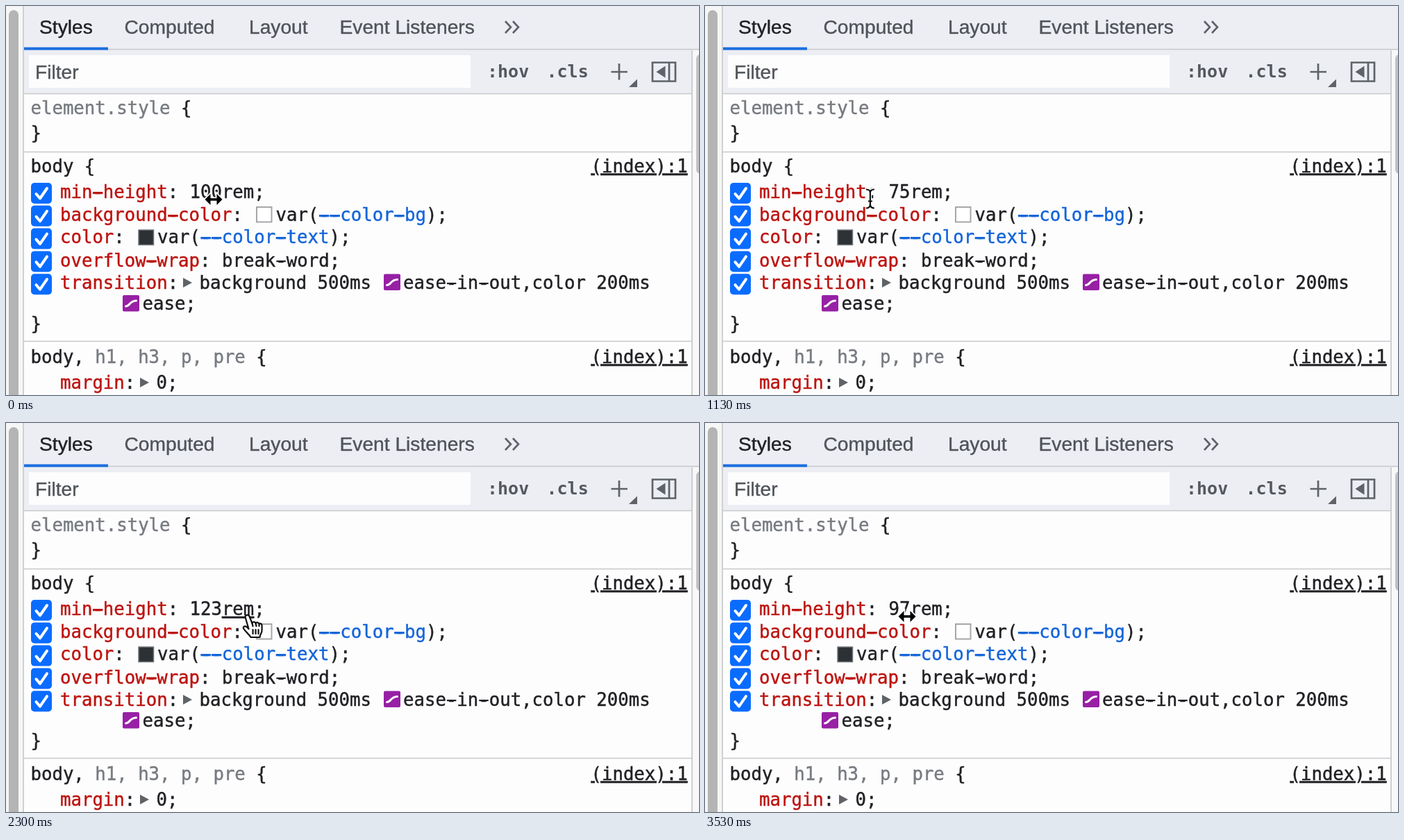
Recreate the animation shown at these times as an HTML page. Size 998x561 px, loop 3.56 s.

```html
<!DOCTYPE html>
<html lang="en">
<head>
<meta charset="utf-8">
<title>Styles pane</title>
<style>
html, body { margin: 0; width: 100%; height: 100%; overflow: hidden; background: #fdfdfe; }
svg { display: block; width: 100vw; height: 100vh; }
text { white-space: pre; fill: #202124; }
.ui { font: 28.2px "Liberation Sans", Arial, sans-serif; fill: #505459; stroke: #505459; stroke-width: .4; }
.ui.on { fill: #202124; stroke: #202124; }
.mono { font: 25.7px "DejaVu Sans Mono", monospace; stroke: #202124; stroke-width: .45; }
.btn { font: bold 25px "DejaVu Sans Mono", monospace; fill: #55595e; }
.link { text-decoration: underline; text-decoration-thickness: 1.6px; text-underline-offset: 2.4px; }
.prop { fill: #bd1410; stroke: #bd1410; }
.name { fill: #1565d8; stroke: #1565d8; }
.dim { fill: #777b80; stroke: #777b80; }
.line { stroke: #c6c8cb; stroke-width: 1.7; }
.icon { fill: none; stroke: #5f6368; stroke-width: 2.7; }
.solid { fill: #5f6368; }
</style>
</head>
<body>
<svg viewBox="0 0 998 561" preserveAspectRatio="none">
  <defs>
    <g id="check">
      <rect width="30" height="30" rx="5" fill="#0a6cff"/>
      <path d="M7.5 16l5.5 6.5L23 8" fill="none" stroke="#fff" stroke-width="4" stroke-linecap="round" stroke-linejoin="round"/>
    </g>
    <g id="ease">
      <rect width="24" height="23.5" rx="2" fill="#9720a5"/>
      <path d="M4.500 16C11 16 9 8.500 19.500 8" fill="none" stroke="#fff" stroke-width="3" stroke-linecap="round"/>
    </g>
    <path id="tri" class="solid" d="M0 1L13 8L0 15Z"/>
    <path id="stem" fill="none" d="M-6 -13Q0 -13 0 -8Q0 -13 6 -13M0 -9V9M-6 14Q0 14 0 8Q0 14 6 14M-3 4H3"/>
  </defs>

  <rect width="998" height="561" fill="#fdfdfe"/>
  <rect width="24" height="561" fill="#f6f6f6"/>
  <rect x="4" y="6" width="14" height="570" rx="7" fill="#b4b4b4"/>
  <rect x="26" width="972" height="126" fill="#eceef4"/>
  <rect x="33" y="71" width="636" height="47" fill="#fdfdfe"/>
  <rect x="988" y="64" width="10" height="497" fill="#f8f8f9"/>
  <rect x="994" y="70" width="12" height="172" rx="6" fill="#c1c1c1"/>
  <path class="line" d="M25 0V561M26 62.500H998M26 126.500H988M26 210.500H988M26 483.500H988M988 64V561"/>
  <rect x="26" y="59.500" width="121" height="4" fill="#1a6fe0"/>

  <text class="ui on" x="48" y="40">Styles</text>
  <text class="ui" x="170.500" y="40">Computed</text>
  <text class="ui" x="350" y="40">Layout</text>
  <text class="ui" x="480.500" y="40">Event Listeners</text>
  <text class="ui" x="42" y="105">Filter</text>
  <text class="btn" x="693" y="103">:hov</text>
  <text class="btn" x="778.500" y="103">.cls</text>
  <path class="icon" d="M719 22l8 8.500l-8 8.500M730 22l8 8.500l-8 8.500"/>
  <path class="icon" d="M871.500 95H895M883 83V106.500M931 81.500H964V108.500H931ZM955 81V109"/>
  <path class="solid" d="M909 105.500V117H897ZM936.500 95L949.500 86.500V103.500Z"/>

  <g id="code"></g>
  <text id="value" class="mono" x="264.500" y="277"><tspan id="num">100</tspan><tspan id="unit">rem</tspan>;</text>

  <rect x="361" y="290" width="21.500" height="21.500" fill="#fff" stroke="#a5a7aa" stroke-width="2"/>
  <rect x="191" y="323" width="21.500" height="21.500" fill="#2c3136" stroke="#6f757a" stroke-width="1.500"/>
  <use href="#tri" x="255" y="391"/>
  <use href="#tri" x="193" y="535"/>
  <use href="#ease" x="544" y="386.500"/>
  <use href="#ease" x="168" y="417"/>

  <g id="resize">
    <path d="M-12.500 0L-4.500 -8V-1.800H4.500V-8L12.500 0L4.500 8V1.800H-4.500V8Z" fill="#000" stroke="#fff" stroke-width="3.500" paint-order="stroke"/>
  </g>
  <g id="beam">
    <use href="#stem" stroke="#fff" stroke-width="4.500"/>
    <use href="#stem" stroke="#111" stroke-width="2.200"/>
  </g>
  <g id="hand" stroke="#111" stroke-width="2.200" stroke-linejoin="round" stroke-linecap="round">
    <path fill="#fff" d="M-7 0C-7 -4 -2 -4 -1 -1L3 9C4 6 7 6 8 9C9 7 12 7 13 10C15 8 17 10 17 12V19C17 23 14 25 14 29H1C-1 25 -6 22 -9 17C-11 14 -8 12 -5 14L-2 17Z"/>
    <path fill="none" d="M3 9L4 13M8 9L9 13M13 10V13M4 18V24M8 18V24M12 18V24"/>
  </g>
</svg>
<script>
const $ = id => document.getElementById(id);
const NS = 'http://www.w3.org/2000/svg';
const LOOP = 3560, PITCH = 15.47;

function add(tag, attrs, parent = $('code')) {
  const el = document.createElementNS(NS, tag);
  for (const k in attrs) el.setAttribute(k, attrs[k]);
  return parent.appendChild(el);
}

// Parts are text, class pairs; hyphens get a wider bar.
function mono(x, y, ...parts) {
  const line = add('text', { x, y, class: 'mono' });
  let col = 0;
  for (let i = 0; i < parts.length; i += 2) {
    const cls = parts[i + 1] || '';
    add('tspan', { class: cls }, line).textContent = parts[i];
    for (const ch of parts[i]) {
      if (ch === '-') {
        const bar = { x: x + col * PITCH + 1, y: y - 8.5, width: 13.5, height: 2.2 };
        add('rect', { ...bar, class: cls, ...(cls ? {} : { fill: '#202124' }) });
      }
      col++;
    }
  }
}

const prop = (y, name) => mono(78, y, name, 'prop', ':');

mono(35.5, 155.5, 'element.style', 'dim', ' {', '');
mono(35.5, 191.5, '}');
mono(35.5, 240, 'body {');
prop(277, 'min-height');
prop(310, 'background-color');
mono(388.5, 310, 'var(', '', '--color-bg', 'name', ');', '');
prop(342, 'color');
mono(218, 342, 'var(', '', '--color-text', 'name', ');', '');
prop(375.5, 'overflow-wrap');
mono(311, 375.5, 'break-word;');
prop(407.5, 'transition');
mono(278.5, 407.5, 'background 500ms');
mono(572, 407.5, 'ease-in-out,color 200ms');
mono(196.5, 437.5, 'ease;');
mono(35.5, 466.5, '}');
mono(35.5, 514.5, 'body, ', '', 'h1, h3, p, pre', 'dim', ' {', '');
prop(552, 'margin');
mono(216.5, 552, '0;');
for (const y of [239.5, 514.5]) mono(842.5, y, '(index):1', 'link');
for (let i = 0; i < 5; i++) add('use', { href: '#check', x: 36, y: 255 + i * 32.8 });

// Time, pointer x, pointer y, dragged value.
const KEYS = [
  [0, 299, 279, 100], [570, 299, 279, 100], [1130, 238, 277.5, 75],
  [1250, 229, 278, 70], [1530, 273, 282, 85], [1930, 345, 280, 119],
  [2130, 360, 280, 125], [2670, 313.5, 280, 111], [3020, 293, 279, 98],
  [3530, 291, 279, 97], [3560, 291, 279, 97]
];

// Tangent that never overshoots the neighbouring keys.
function slope(i, c) {
  const a = KEYS[i - 1], b = KEYS[i], d = KEYS[i + 1];
  if (!a || !d) return 0;
  const l = (b[c] - a[c]) / (b[0] - a[0]), r = (d[c] - b[c]) / (d[0] - b[0]);
  return l * r <= 0 ? 0 : 2 * l * r / (l + r);
}

function at(t, c) {
  let i = 0;
  while (i < KEYS.length - 2 && t >= KEYS[i + 1][0]) i++;
  const a = KEYS[i], b = KEYS[i + 1], span = b[0] - a[0];
  const u = (t - a[0]) / span, v = 1 - u;
  return v * v * (1 + 2 * u) * a[c] + u * u * (1 + 2 * v) * b[c]
    + span * u * v * (v * slope(i, c) - u * slope(i + 1, c));
}

function draw(t) {
  const x = at(t, 1), y = at(t, 2), value = String(Math.round(at(t, 3)));
  const unitX = 264.5 + value.length * PITCH;
  const kind = x < 264.5 ? 'beam' : x < unitX ? 'resize' : 'hand';
  $('num').textContent = value;
  $('unit').setAttribute('class', kind === 'hand' ? 'link' : '');
  for (const id of ['beam', 'resize', 'hand']) {
    $(id).style.display = id === kind ? '' : 'none';
    $(id).setAttribute('transform', `translate(${x} ${y})`);
  }
}

const start = performance.now();
function tick() {
  draw((performance.now() - start) % LOOP);
  requestAnimationFrame(tick);
}
tick();
</script>
</body>
</html>
```
